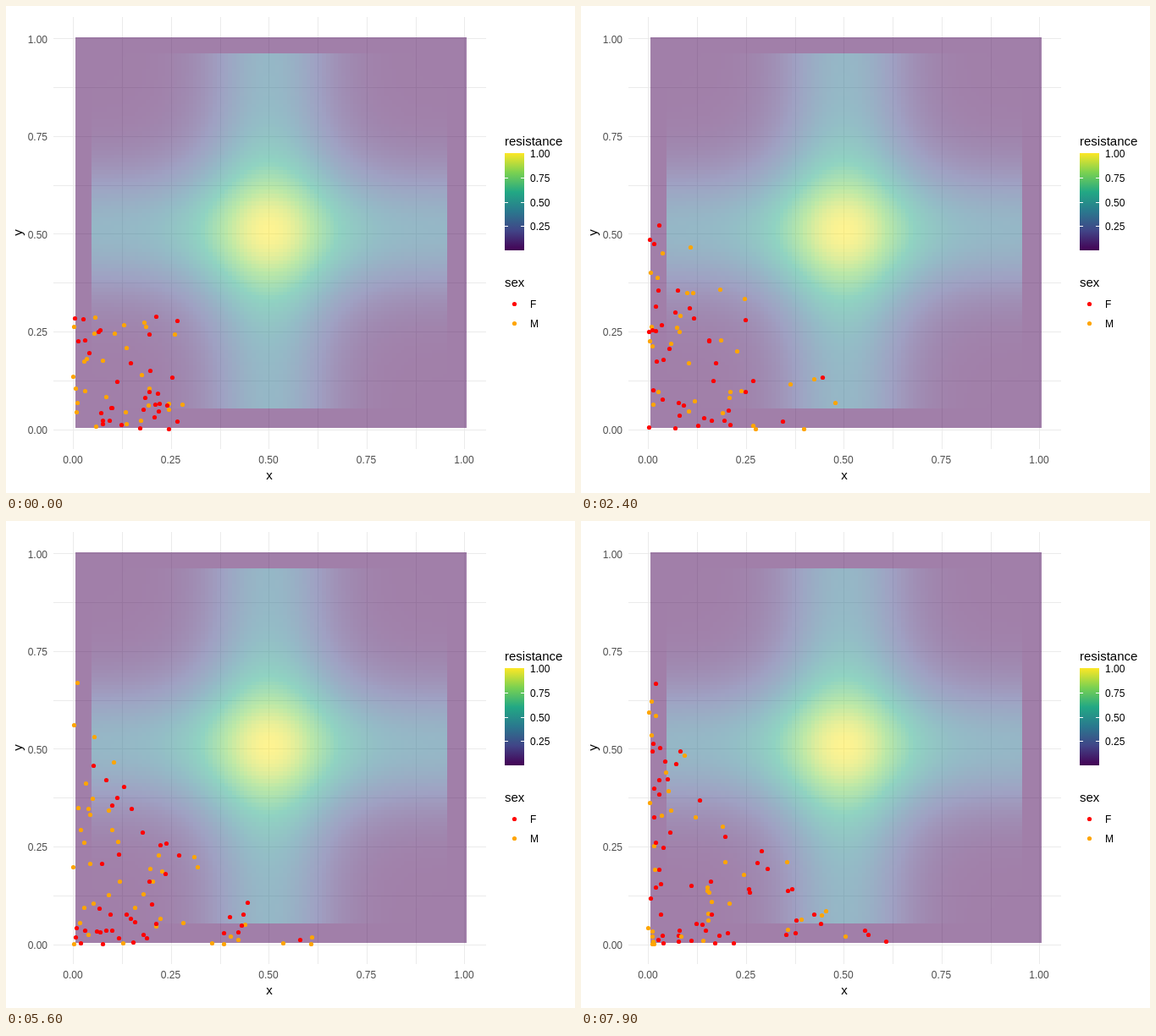
Animation, 672 px wide and 576 px high, one loop 8000 ms. Source, as an HTML page with a canvas:

```html
<!DOCTYPE html>
<html lang="en">
<head>
<meta charset="utf-8">
<title>Dispersal over a resistance surface</title>
<style>
  html, body { margin: 0; width: 100%; height: 100%; overflow: hidden; background: #fff; }
  canvas, svg { position: absolute; left: 0; top: 0; display: block; }
  text { font: 12px "Liberation Sans", Arial, sans-serif; }
  .title { font-size: 15px; }
  .axis { fill: #4d4d4d; }
  .mid { text-anchor: middle; }
  .end { text-anchor: end; }
</style>
</head>
<body>
<canvas id="stage" width="672" height="576"></canvas>
<svg id="labels" width="672" height="576">
  <text class="title mid" x="311" y="560">x</text>
  <text class="title mid" transform="translate(19 268) rotate(-90)">y</text>
  <text class="title" x="589" y="165">resistance</text>
  <text class="title" x="589" y="332">sex</text>
  <text x="619" y="357">F</text>
  <text x="619" y="380">M</text>
</svg>
<script>
const W = 672, H = 576, STEP = 100, STEPS = 80, CELLS = 100, CELL = 4.62;
const RED = '#ff0000', ORANGE = '#ffa500';
const PALETTE = ['440154', '414487', '2a788e', '22a884', '7ad151', 'fde725'];
const RGB = PALETTE.map(h => [0, 2, 4].map(i => parseInt(h.slice(i, i + 2), 16)));

const ctx = document.getElementById('stage').getContext('2d');
const labels = document.getElementById('labels');

const toX = x => 79.5 + 462 * x;
const toY = y => 501 - 462.2 * y;

function shade(t) {
  const p = t * 5, i = Math.min(4, Math.floor(p));
  return `rgb(${RGB[i].map((v, k) => Math.round(v + (RGB[i + 1][k] - v) * (p - i)))})`;
}

function label(text, x, y, cls) {
  const el = document.createElementNS('http://www.w3.org/2000/svg', 'text');
  el.setAttribute('x', x);
  el.setAttribute('y', y);
  el.setAttribute('class', cls);
  el.textContent = text;
  labels.append(el);
}

function dot(g, x, y, color) {
  g.fillStyle = color;
  g.beginPath();
  g.arc(Math.floor(x) + 0.5, Math.floor(y) + 0.5, 2.6, 0, 2 * Math.PI);
  g.fill();
}

// Two crossing ridges inside a flat margin
function resistance(col, row) {
  const dx = col - 49, dy = row - 49;
  if (Math.max(Math.abs(dx), Math.abs(dy)) > 45) return 0;
  const ridge = d => Math.exp(-d * d / 340);
  return ((ridge(dx) + ridge(dy)) / 2) ** 1.43;
}

function drawSurface(g) {
  const left = i => Math.round(82.2 + CELL * i);
  const top = i => Math.round(37.2 + CELL * i);
  g.globalAlpha = 0.5;
  for (let row = 0; row < CELLS; row++) {
    for (let col = 0; col < CELLS; col++) {
      const x = left(col), y = top(row);
      g.fillStyle = shade(resistance(col, row));
      g.fillRect(x, y, left(col + 1) - x, top(row + 1) - y);
    }
  }
  g.globalAlpha = 1;
}

function drawLegend(g) {
  const bar = g.createLinearGradient(0, 289, 0, 174);
  PALETTE.forEach((h, i) => bar.addColorStop(i / 5, '#' + h));
  g.fillStyle = bar;
  g.fillRect(589, 174, 23, 115);
  g.fillStyle = '#fff';
  for (const y of [203, 232, 260]) {
    g.fillRect(589, y, 4, 1);
    g.fillRect(608, y, 4, 1);
  }
  dot(g, 600, 352, RED);
  dot(g, 600, 375, ORANGE);
}

function makeChart() {
  const c = document.createElement('canvas'), g = c.getContext('2d');
  c.width = W;
  c.height = H;
  g.fillStyle = '#fff';
  g.fillRect(0, 0, W, H);
  g.fillStyle = '#ebebeb';
  for (let i = 0; i <= 8; i++) {
    g.fillRect(Math.round(toX(i / 8) - 0.2), 13, 1, 511);
    g.fillRect(56, Math.floor(toY(i / 8)), 511, 1);
  }
  drawSurface(g);
  drawLegend(g);
  return c;
}

function seeded(seed) {
  return () => {
    seed = (seed + 0x6d2b79f5) | 0;
    let t = Math.imul(seed ^ (seed >>> 15), 1 | seed);
    t = (t + Math.imul(t ^ (t >>> 7), 61 | t)) ^ t;
    return ((t ^ (t >>> 14)) >>> 0) / 4294967296;
  };
}

// Starts as a square in the corner; each generation spreads further along the two edges
function drawGeneration(n) {
  const rand = seeded(n * 7919 + 1);
  const reach = 0.68 - 0.39 * Math.exp(-n / 18);
  const bend = Math.min(1.4, n / 25 - 1);
  const hug = 1.2 + 0.4 * Math.min(1, n / 20);
  let left = Math.round(55 + 0.4 * n + 10 * rand());
  while (left > 0) {
    const u = rand() ** hug, v = rand() ** hug;
    if (u + v + bend * u * v > 1) continue;
    const r = reach * (n > 40 && rand() < 0.05 ? 1.3 : 1);
    dot(ctx, toX(u * r), toY(v * r), rand() < 0.5 ? RED : ORANGE);
    left--;
  }
}

for (let i = 0; i <= 4; i++) {
  const text = (i / 4).toFixed(2);
  label(text, toX(i / 4) - 0.5, 541, 'axis mid');
  label(text, 49, Math.round(toY(i / 4)) + 5, 'axis end');
  if (i) label(text, 619, Math.round(294 - 28.75 * i), '');
}

const chart = makeChart();
let shown = -1;

function frame() {
  const n = Math.floor(performance.now() / STEP) % STEPS;
  if (n !== shown) {
    shown = n;
    ctx.drawImage(chart, 0, 0);
    drawGeneration(n);
  }
  requestAnimationFrame(frame);
}
frame();
</script>
</body>
</html>
```
